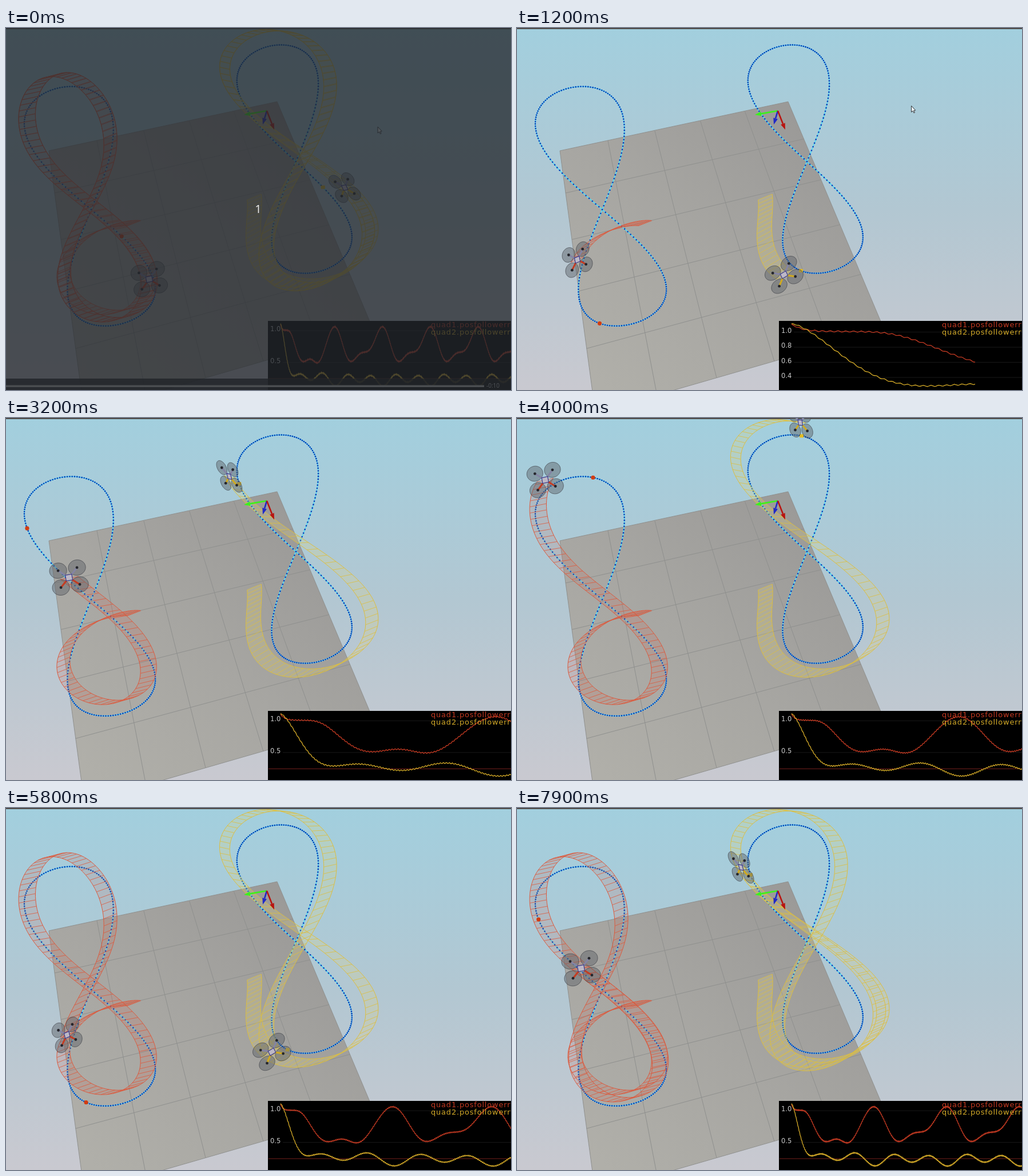
Animation, 883 px wide and 634 px high, one loop 8 s. Source, as an HTML page with a canvas:

```html
<!DOCTYPE html>
<html lang="en">
<head>
<meta charset="utf-8">
<title>Two quadrotors on figure eights</title>
<style>
  html, body { margin: 0; width: 883px; height: 634px; overflow: hidden; background: #b2c5d0; }
  canvas { display: block; }
</style>
</head>
<body>
<canvas id="stage" width="883" height="634"></canvas>
<script>
const W = 883, H = 634, LOOP = 8000, STEP = 100;
const LAP = 4705, ERROR_PERIOD = 2400, PREVIEW = 11557;
const ctx = document.getElementById('stage').getContext('2d');

// track: centre, long axis, cross axis, bend by perspective
// flight: mean, then cosine and sine vector of each harmonic
// arms: both rotor arms as [ax, ay, bx, by]: mean and two leans a quarter lap apart
// error: mean, harmonics [cos, sin], phase time, start [size, time, power], bumps [time, width, size]
const quads = [
  {
    line: '#dc5a3e', fill: 'rgba(205,95,75,.16)', arm: '#c43c22', dot: '#d23c12', plot: '#c43a22', round: true,
    track: [[149, 318], [53, 207], [-75, 17], [-4, -6]],
    start: [224, 342],
    flight: [[140, 296], [-26, -118.5], [44, 164], [67, -10], [-20, 3], [0, 11], [8, 4]],
    arms: [[17, 10, 11.5, -18], [2, 2, 2.5, .5], [0, 0, 0, 0]],
    error: { mean: .749, waves: [[.228, -.035], [.083, .047]], phase: 2670,
      start: [.2, 80, 1], bumps: [[300, 200, -.06], [1850, 350, -.17]] }
  },
  {
    line: '#dcbe40', fill: 'rgba(225,215,120,.22)', arm: '#d0aa20', dot: '#e2bc24', plot: '#d4aa28', round: false,
    track: [[507, 234], [42.5, 197.5], [-69, 16], [-4.5, -4.5]],
    start: [434, 296],
    flight: [[509, 223], [0, -14], [43, 215], [25, -6], [-86.5, 6.5], [1, 0], [8, -9]],
    arms: [[16, 9.5, 7.8, -15.8], [-3, 6, -1.5, 4], [2.5, -2.5, -2, -1]],
    error: { mean: .228, waves: [[-.031, .008], [-.071, -.006]], phase: 2740,
      start: [.89, 385, 1.7], bumps: [[1900, 500, .05]] }
  }
];

const bell = (t, centre, width) => Math.exp(-(((t - centre) / width) ** 2));

const flightTime = t => Math.max(0, t - 300 + 105 * bell(t, 5200, 1100));

const lapAngle = t => t / LAP * 2 * Math.PI;

function trackPoint(q, angle) {
  const s = Math.sin(angle), weights = [1, s, Math.sin(2 * angle), s * s];
  return [0, 1].map(c => weights.reduce((sum, w, i) => sum + w * q.track[i][c], 0));
}

function orbit(q, angle) {
  return [0, 1].map(c => {
    let v = q.flight[0][c];
    for (let n = 1; n <= 3; n++)
      v += q.flight[2 * n - 1][c] * Math.cos(n * angle) + q.flight[2 * n][c] * Math.sin(n * angle);
    return v;
  });
}

// the start offset dies out as a damped swing
function pose(q, t) {
  const angle = lapAngle(t), first = orbit(q, 0);
  const swing = Math.exp(-t / 653) * Math.cos(t / 588);
  const [x, y] = orbit(q, angle).map((v, c) => v + (q.start[c] - first[c]) * swing);
  const p = Math.cos(angle - 1.25 * Math.PI), r = Math.cos(angle - .75 * Math.PI);
  const [ax, ay, bx, by] = q.arms[0].map((m, i) => m + p * q.arms[1][i] + r * q.arms[2][i]);
  return { x, y, ax, ay, bx, by };
}

function errorAt({ error: e }, t) {
  const angle = (t - e.phase) / ERROR_PERIOD * 2 * Math.PI;
  const [size, time, power] = e.start;
  let v = e.mean + size * Math.exp(-((t / time) ** power));
  e.waves.forEach(([c, s], i) => v += c * Math.cos((i + 1) * angle) + s * Math.sin((i + 1) * angle));
  e.bumps.forEach(([at, width, height]) => v += height * bell(t, at, width));
  const saw = Math.abs((t / 38) % 1 - .5) * 4 - 1;
  return v + saw * .009 * Math.min(1, t / 30);
}

function trace(points, close) {
  ctx.beginPath();
  points.forEach(([x, y], i) => i ? ctx.lineTo(x, y) : ctx.moveTo(x, y));
  if (close) ctx.closePath();
}

function line(from, to, color, width = 1) {
  trace([from, to]);
  ctx.strokeStyle = color;
  ctx.lineWidth = width;
  ctx.stroke();
}

function disc(x, y, r, color) {
  ctx.beginPath();
  ctx.arc(x, y, r, 0, 7);
  ctx.fillStyle = color;
  ctx.fill();
}

function gradient(x0, y0, x1, y1, ...colors) {
  const g = ctx.createLinearGradient(x0, y0, x1, y1);
  colors.forEach((c, i) => g.addColorStop(i / (colors.length - 1), c));
  return g;
}

// projective map from the unit square to a quadrilateral
function projection([x0, y0], [x1, y1], [x2, y2], [x3, y3]) {
  const ux = x1 - x2, uy = y1 - y2, vx = x3 - x2, vy = y3 - y2;
  const sx = x0 - x1 + x2 - x3, sy = y0 - y1 + y2 - y3;
  const det = ux * vy - vx * uy;
  const g = (sx * vy - vx * sy) / det, h = (ux * sy - sx * uy) / det;
  return (u, v) => {
    const d = 1 + g * u + h * v;
    return [
      (x0 + (x1 - x0 + g * x1) * u + (x3 - x0 + h * x3) * v) / d,
      (y0 + (y1 - y0 + g * y1) * u + (y3 - y0 + h * y3) * v) / d
    ];
  };
}

const floor = projection([75, 215], [474, 129], [642, 528], [137, 674]);

function drawWorld() {
  ctx.fillStyle = gradient(0, 0, 0, H, '#a2cfde', '#b2c7d2', '#c9c9d0');
  ctx.fillRect(0, 0, W, H);
  trace([floor(0, 0), floor(1, 0), floor(1, 1), floor(0, 1)], true);
  ctx.fillStyle = gradient(120, 600, 500, 170, '#b0afa9', '#a7a6a2', '#9b9a98');
  ctx.fill();
  for (let i = 0; i <= 1; i += .2) {
    line(floor(i, 0), floor(i, 1), '#8f908e');
    line(floor(0, i), floor(1, i), '#8f908e');
  }
  ctx.fillStyle = '#4f4a48';
  ctx.fillRect(0, 0, W, 2);
}

function drawTrack(q) {
  const n = 222, points = [];
  for (let i = 0; i < n; i++) points.push(trackPoint(q, i / n * 2 * Math.PI));
  trace(points, true);
  ctx.strokeStyle = '#5cd6f0';
  ctx.lineWidth = 2;
  ctx.stroke();
  points.forEach(([x, y]) => disc(x, y, 1.3, '#0b3ab4'));
}

function drawRibbon(q, sim) {
  const left = [], right = [], half = .46;
  const add = t => {
    const p = pose(q, t), hx = half * (p.ax + p.bx), hy = half * (p.ay + p.by);
    left.push([p.x - hx, p.y - hy]);
    right.push([p.x + hx, p.y + hy]);
  };
  for (let t = 0; t < sim; t += 25) add(t);
  add(sim);

  // all strips wind the same way, so overlaps stay one flat tint
  ctx.beginPath();
  for (let i = 1; i < left.length; i++) {
    const [a, b, c, d] = [left[i - 1], right[i - 1], right[i], left[i]];
    const area = (c[0] - a[0]) * (d[1] - b[1]) - (c[1] - a[1]) * (d[0] - b[0]);
    (area > 0 ? [a, b, c, d] : [d, c, b, a])
      .forEach(([x, y], j) => j ? ctx.lineTo(x, y) : ctx.moveTo(x, y));
    ctx.closePath();
  }
  ctx.fillStyle = q.fill;
  ctx.fill();

  ctx.strokeStyle = q.line;
  ctx.lineWidth = 1;
  for (const side of [left, right]) {
    trace(side);
    ctx.stroke();
  }
  ctx.beginPath();
  for (let i = 0; i < left.length; i += 2) {
    ctx.moveTo(...left[i]);
    ctx.lineTo(...right[i]);
  }
  ctx.globalAlpha = .8;
  ctx.stroke();
  ctx.globalAlpha = 1;
}

function arrow(x, y, color) {
  const x0 = 456, y0 = 145, head = 11, r = 4;
  const len = Math.hypot(x - x0, y - y0);
  const ux = (x - x0) / len, uy = (y - y0) / len;
  const bx = x - ux * head, by = y - uy * head;
  line([x0, y0], [bx, by], color, 2.6);
  trace([[x, y], [bx - uy * r, by + ux * r], [bx + uy * r, by - ux * r]], true);
  ctx.fillStyle = color;
  ctx.fill();
}

function drawAxes() {
  arrow(416, 152, '#3cf01c');
  arrow(449, 169, '#2028c8');
  arrow(469, 178, '#b81410');
}

function drawQuad(q, sim) {
  const { x, y, ax, ay, bx, by } = pose(q, sim);
  const at = (u, v) => [x + u * ax + v * bx, y + u * ay + v * by];
  const rotors = [[-1, 0, '#8484a4'], [0, 1, '#8484a4'], [0, -1, q.arm], [1, 0, q.arm]];
  for (const [u, v] of rotors) {
    const rim = [];
    for (let a = 0; a < 2 * Math.PI; a += .2) rim.push(at(u + .64 * Math.cos(a), v + .64 * Math.sin(a)));
    trace(rim, true);
    ctx.fillStyle = 'rgba(92,96,102,.46)';
    ctx.fill();
    ctx.strokeStyle = 'rgba(55,58,64,.6)';
    ctx.lineWidth = 1;
    ctx.stroke();
  }
  for (const [u, v, color] of rotors) {
    line([x, y], at(u, v), color, 3);
    disc(...at(u, v), 2.4, '#25262c');
  }
  trace([at(-.34, 0), at(0, .34), at(.34, 0), at(0, -.34)], true);
  ctx.fillStyle = '#bdb8c6';
  ctx.fill();
  ctx.strokeStyle = '#39398a';
  ctx.lineWidth = 1.2;
  ctx.stroke();
}

function drawGoal(q, sim) {
  const [x, y] = trackPoint(q, lapAngle(sim));
  if (q.round) return disc(x, y, 3.6, q.dot);
  ctx.fillStyle = q.dot;
  ctx.fillRect(x - 3.5, y - 3, 7, 6);
}

function drawPlot(sim) {
  const x0 = 480, top = 518, tall = 110, max = 1.11, dt = 6;
  const span = Math.max(1130, sim);
  const series = quads.map(q => {
    const s = [];
    for (let t = 0; t < sim; t += dt) s.push([t, errorAt(q, t)]);
    s.push([sim, errorAt(q, sim)]);
    return s;
  });
  const min = Math.min(max - .2, ...series[1].map(p => p[1]));
  const range = max - min;
  const py = v => top + (max - v) / range * tall;

  ctx.save();
  ctx.beginPath();
  ctx.rect(458, 513, W - 458, H - 513);
  ctx.clip();
  ctx.fillStyle = '#000';
  ctx.fillRect(458, 513, W - 458, H - 513);

  const step = range < .4 ? .05 : range < .6 ? .1 : range < .92 ? .2 : .5;
  ctx.font = '11.5px "DejaVu Sans", sans-serif';
  ctx.textBaseline = 'middle';
  ctx.textAlign = 'left';
  for (let i = Math.floor(max / step + 1e-6); i * step > min + .08 * range; i--) {
    const y = py(i * step);
    line([484, y], [W, y], '#191919');
    ctx.fillStyle = '#c8c8c8';
    ctx.fillText((i * step).toFixed(step < .1 ? 2 : 1), 462, y - 2);
  }
  const limit = py(.243);
  if (limit < 632) line([459, limit], [W, limit], '#74201c');

  series.forEach((s, i) => {
    trace(s.map(([t, v]) => [x0 + t / span * (W - x0), py(v)]));
    ctx.strokeStyle = quads[i].plot;
    ctx.lineWidth = 1.3;
    ctx.stroke();
  });

  ctx.font = '13px "DejaVu Sans", sans-serif';
  ctx.letterSpacing = '0.8px';
  quads.forEach((q, i) => {
    ctx.fillStyle = q.plot;
    ctx.fillText(`quad${i + 1}.posfollowerr`, 743, 521 + i * 12.5);
  });
  ctx.letterSpacing = '0px';
  ctx.restore();
}

function drawPlayerBar() {
  ctx.fillStyle = 'rgba(22,22,24,.8)';
  ctx.fillRect(0, 614, W, 20);
  ctx.fillStyle = '#cbcbc8';
  ctx.fillRect(0, 625.5, 836, 3.5);
  ctx.font = '10px "Open Sans", sans-serif';
  ctx.textBaseline = 'middle';
  ctx.textAlign = 'left';
  ctx.fillStyle = '#e4e4e4';
  ctx.fillText('-0:10', 840, 627.5);
}

function drawCursor(t) {
  if (t >= 2600) return;
  const move = Math.min(1, Math.max(0, (t - 1000) / 900));
  const x = 650 + 178 * move, y = 173 - 165 * move;
  trace([[0, 0], [0, 11], [2.6, 8.8], [4.4, 12.5], [6, 11.7], [4.3, 8.2], [7.2, 7.8]]
    .map(p => [x + p[0], y + p[1]]), true);
  ctx.fillStyle = '#e8eef0';
  ctx.fill();
  ctx.strokeStyle = '#33383c';
  ctx.lineWidth = 1;
  ctx.stroke();
}

function drawCountdown() {
  ctx.fillStyle = 'rgba(36,40,45,.77)';
  ctx.fillRect(0, 0, W, H);
  ctx.font = '20px "Open Sans", sans-serif';
  ctx.textAlign = 'center';
  ctx.textBaseline = 'alphabetic';
  ctx.fillStyle = '#f2f2f2';
  ctx.fillText('1', 441, 324);
}

function draw(t) {
  const waiting = t < 100;
  const sim = waiting ? PREVIEW : flightTime(t);
  drawWorld();
  quads.forEach(drawTrack);
  quads.forEach(q => drawRibbon(q, sim));
  drawAxes();
  quads.forEach(q => drawGoal(q, sim));
  quads.forEach(q => drawQuad(q, sim));
  drawPlot(sim);
  if (t < 900) drawPlayerBar();
  drawCursor(t);
  if (waiting) drawCountdown();
}

let shown = -1;
function tick() {
  const t = Math.floor(performance.now() % LOOP / STEP) * STEP;
  if (t !== shown) draw(shown = t);
  requestAnimationFrame(tick);
}
tick();
</script>
</body>
</html>
```
